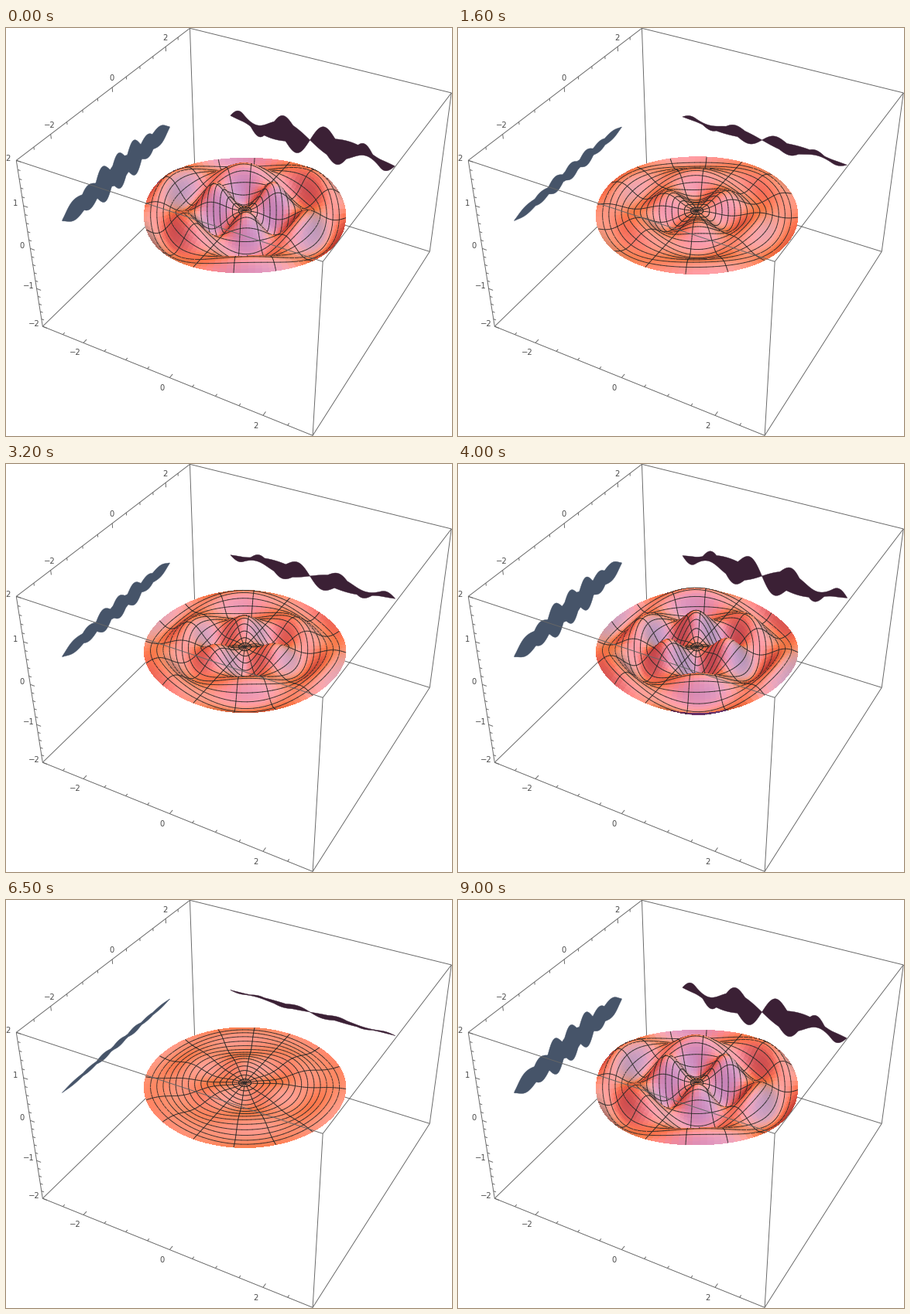
Animation, 576 px wide and 528 px high, one loop 9.1 s. Source, as a matplotlib script:

```python
import numpy as np
import matplotlib.pyplot as plt
from matplotlib.animation import FuncAnimation
from matplotlib.collections import LineCollection, PolyCollection

W, H, DPI = 576, 528, 100
PX = 72 / DPI                       # points per pixel
FRAMES, INTERVAL = 91, 100

# Perspective camera; the 6 x 6 x 4 box is scaled so its long side is 1
EYE = np.array([1.3, -2.4, 2.0])
DIST = np.linalg.norm(EYE)
TOWARD = EYE / DIST
RIGHT = np.cross([0, 0, 1], TOWARD)
RIGHT /= np.linalg.norm(RIGHT)
CAM = np.array([RIGHT, np.cross(TOWARD, RIGHT), TOWARD])
SCALE, CX, CY = 1317.7, 308.6, 236.6

# Directional lights in camera space: direction, colour
LIGHTS = [((1.5, -0.5, 1.5), (0, 0.18, 0.5)),
          ((1.5, 1.5, 2.5), (0.18, 0.5, 0.18)),
          ((-0.5, 1.5, 1.5), (0.5, 0.18, 0)),
          ((-0.5, -0.5, 1.5), (0, 0, 0.18))]
AMBIENT = np.array([0.4, 0.2, 0.2])
SKIN = np.array([0.99, 0.675, 0.84])
LINE, BLUE, PLUM, GREY = "#2a2a28", "#465469", "#3b2035", "#666666"

RADIUS, WAVE = 2.0, 6.38016         # WAVE is the first zero of J3
NR, NT, RING, SPOKE = 48, 96, 3, 6


def to_cam(p):
    return np.asarray(p, float) / 6 @ CAM.T


def to_screen(q):
    s = SCALE / (DIST - q[..., 2])
    return np.stack([CX + s * q[..., 0], CY - s * q[..., 1]], -1)


def project(p):
    return to_screen(to_cam(p))


def bessel3(x):
    tau = np.arange(64) * 2 * np.pi / 64
    return np.cos(3 * tau - np.asarray(x)[..., None] * np.sin(tau)).mean(-1)


def mode(x, y):
    return -bessel3(WAVE * np.hypot(x, y)) * np.cos(3 * np.arctan2(y, x))


def shade(normal):
    light = np.broadcast_to(AMBIENT, normal.shape).copy()
    for way, colour in LIGHTS:
        way = np.array(way) / np.linalg.norm(way)
        light += np.clip(normal @ way, 0, None)[..., None] * np.array(colour)
    return np.clip(light * SKIN, 0, 1)


r, th = np.meshgrid(np.linspace(0, RADIUS, NR + 1),
                    np.linspace(0, 2 * np.pi, NT + 1), indexing="ij")
X, Y = r * np.cos(th), r * np.sin(th)
Z = mode(X, Y)

# Extent of the surface seen along each wall
along = np.linspace(-RADIUS, RADIUS, 181)
across = np.sqrt(RADIUS**2 - along**2)[:, None] * np.linspace(-1, 1, 121)
over_x = mode(along[:, None], across)
over_y = mode(across, along[:, None])


def ribbon(heights, c, wall):
    lo, hi = (c * heights).min(1), (c * heights).max(1)
    a, z = np.r_[along, along[::-1]], np.r_[lo, hi[::-1]]
    k = np.full_like(a, 3)
    return project(np.stack([a, k, z] if wall == "y" else [-k, a, z], -1))


def segments(a, b):
    return np.stack([a, b, b, a], -2).reshape(-1, 4, a.shape[-1])


def surface(c):
    q = to_cam(np.stack([X, Y, c * Z], -1))
    faces = np.stack([q[:-1, :-1], q[1:, :-1], q[1:, 1:], q[:-1, 1:]], 2)
    faces = faces.reshape(-1, 4, 3)
    n = np.cross(faces[:, 2] - faces[:, 0], faces[:, 3] - faces[:, 1])
    n /= np.linalg.norm(n, axis=1, keepdims=True)
    view = np.array([0, 0, DIST]) - faces.mean(1)
    n *= np.where((n * view).sum(1) < 0, -1, 1)[:, None]

    rings, spokes = q[RING:-1:RING], q[:, SPOKE:-1:SPOKE]
    lines = np.concatenate([segments(rings[:, :-1], rings[:, 1:]),
                            segments(spokes[:-1], spokes[1:])])
    near = np.r_[faces[:, :, 2].mean(1), lines[:, :, 2].mean(1) + 0.014]
    order = np.argsort(near)
    polys = to_screen(np.concatenate([faces, lines]))[order]
    fill = np.zeros((len(near), 4))
    fill[:len(faces), :3] = shade(n)
    fill[:len(faces), 3] = 1
    return polys, fill[order], order >= len(faces)


fig = plt.figure(figsize=(W / DPI, H / DPI), dpi=DPI, facecolor="white")
ax = fig.add_axes([0, 0, 1, 1])
ax.set(xlim=(0, W), ylim=(H, 0))
ax.axis("off")


def add_lines(segs, z):
    ax.add_collection(LineCollection(segs, colors=GREY, linewidths=0.95 * PX,
                                     zorder=z))


def edge(a, b):
    return project([a, b])


back = (-3, 3, -2)
add_lines([edge(back, p) for p in [(-3, 3, 2), (-3, -3, -2), (3, 3, -2)]], 1)
top = [(-3, -3, 2), (3, -3, 2), (3, 3, 2), (-3, 3, 2)]
front = [edge(top[i], top[(i + 1) % 4]) for i in range(4)]
front += [edge(p, (p[0], p[1], -2)) for p in top[:3]]
front += [edge((-3, -3, -2), (3, -3, -2)), edge((3, -3, -2), (3, 3, -2))]


def axis(place, inward, values, major, gap):
    for v in values:
        p = np.array(place(v), float)
        a, b = project([p, p + 0.1 * np.array(inward)])
        d = (b - a) / np.linalg.norm(b - a)
        big = abs(v / major - round(v / major)) < 1e-6
        front.append([a, a + d * (6 if big else 3.5)])
        if big:
            x, y = a - d * gap
            label = f"{round(v)}".replace("-", "\u2212")
            ax.text(x, y, label, fontsize=10 * PX, family="DejaVu Sans",
                    color="#4a4a4a", ha="center", va="center_baseline",
                    zorder=5)


halves = np.arange(-2.5, 2.6, 0.5)
axis(lambda v: (v, -3, -2), (0, 1, 0), halves, 2, 16)
axis(lambda v: (-3, v, 2), (0, 0, -1), halves, 2, 12.5)
axis(lambda v: (-3, -3, v), (1, 0, 0), np.linspace(-2, 2, 21), 1, 11.5)
add_lines(front, 4)

blue = ax.fill([0], [0], color=BLUE, lw=0.4 * PX, zorder=2)[0]
plum = ax.fill([0], [0], color=PLUM, lw=0.4 * PX, zorder=2)[0]
skin = PolyCollection([], zorder=3, joinstyle="round", capstyle="round")
ax.add_collection(skin, autolim=False)


def draw(i):
    c = np.cos(2 * np.pi * i / (FRAMES - 1))
    blue.set_xy(ribbon(over_y, c, "x"))
    plum.set_xy(ribbon(over_x, c, "y"))
    polys, fill, is_line = surface(c)
    skin.set_verts(polys)
    skin.set_facecolor(fill)
    ink = np.zeros_like(fill)
    ink[is_line] = plt.matplotlib.colors.to_rgba(LINE, 0.9)
    skin.set_edgecolor(ink)
    skin.set_linewidth(np.where(is_line, 0.95 * PX, 0))
    skin.set_antialiased(is_line)
    return blue, plum, skin


anim = FuncAnimation(fig, draw, frames=FRAMES, interval=INTERVAL, repeat=True,
                     repeat_delay=0, init_func=lambda: draw(0))
plt.show()
```
